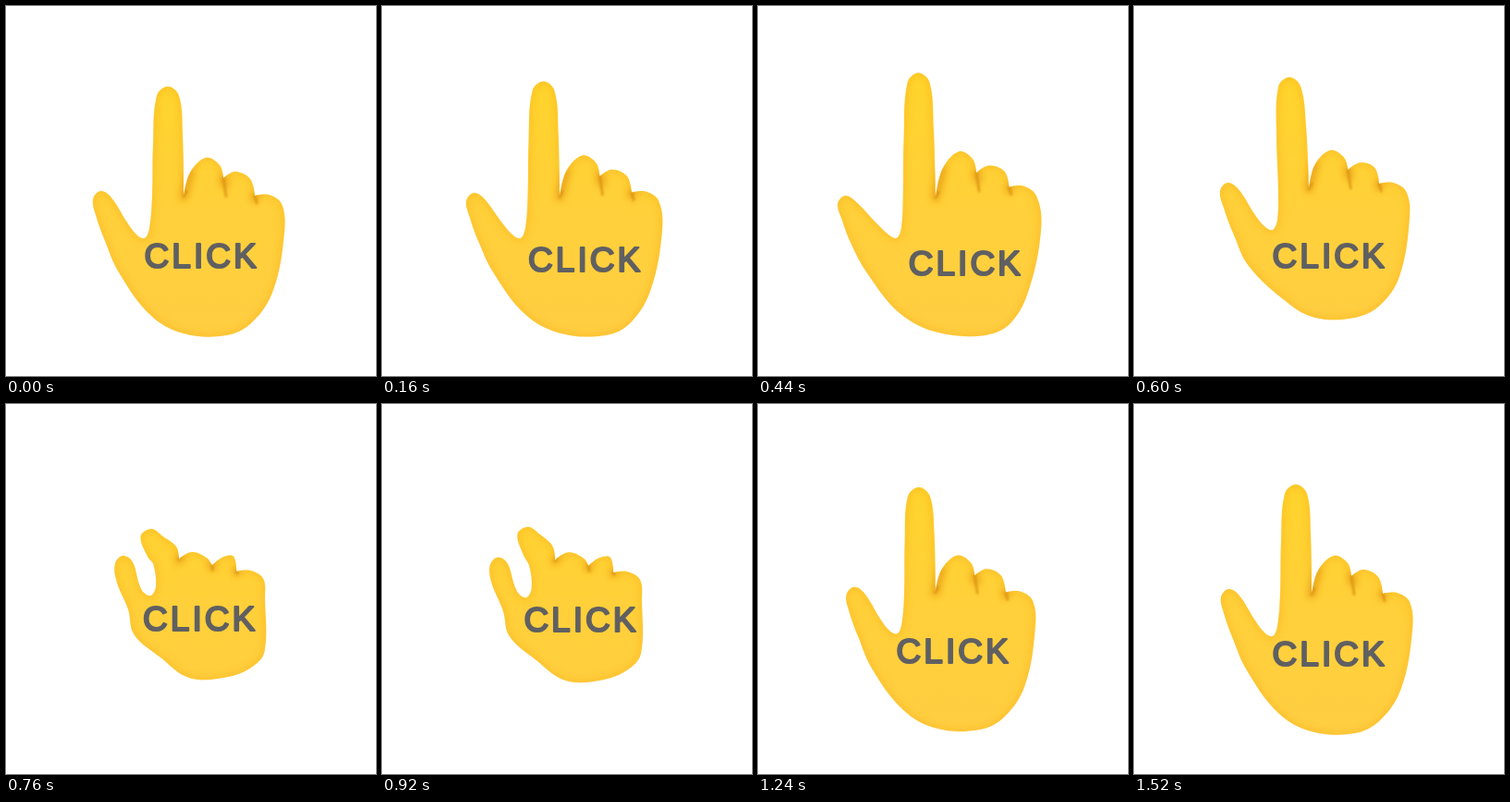
An HTML page that plays this animation: 400 px wide and 400 px high, repeating every 1.56 s.

```html
<!DOCTYPE html>
<html lang="en">
<head>
<meta charset="utf-8">
<title>Click</title>
<style>
  html, body { margin: 0; width: 100%; height: 100%; overflow: hidden; background: #fff; }
  svg { display: block; width: 100%; height: 100%; }
  text {
    font: 37px "Liberation Sans", Arial, sans-serif;
    letter-spacing: 3px;
    fill: #606062;
    stroke: #606062;
    stroke-width: 2.2px;
    stroke-linejoin: round;
  }
</style>
</head>
<body>
<svg viewBox="0 0 400 400">
  <defs>
    <linearGradient id="skin" gradientUnits="userSpaceOnUse" x1="0" y1="80" x2="0" y2="357">
      <stop offset="0" stop-color="#ffd42c"/>
      <stop offset=".5" stop-color="#ffd03a"/>
      <stop offset="1" stop-color="#ffce42"/>
    </linearGradient>
    <filter id="soft" filterUnits="userSpaceOnUse" x="0" y="0" width="400" height="400">
      <feGaussianBlur stdDeviation="3.5"/>
    </filter>
    <filter id="fine" filterUnits="userSpaceOnUse" x="0" y="0" width="400" height="400">
      <feGaussianBlur stdDeviation="1.3"/>
    </filter>
    <clipPath id="clip"><path id="edge"/></clipPath>
  </defs>
  <path id="hand" fill="url(#skin)"/>
  <g clip-path="url(#clip)" fill="none" stroke-linecap="round">
    <path id="rim" stroke="#f9b31c" stroke-width="6" opacity=".5" filter="url(#soft)"/>
    <path id="shade" stroke="#e39a14" stroke-width="9" opacity=".65" filter="url(#soft)"/>
    <path id="crease" stroke="#d98e10" stroke-width="2.6" opacity=".8" filter="url(#fine)"/>
  </g>
  <text id="label">CLICK</text>
</svg>
<script>
const LOOP = 1560, STEP = 40;
const $ = id => document.getElementById(id);

// Sharp notches between the fingers; the rest of the outline is smooth.
const gap = [192, 206], cut = [235, 186], nick = [269, 205];
const sharp = new Set([gap, cut, nick]);
const index = [[150, 251], [155, 240], [158, 205], [159, 150], [163, 97], [175, 87], [187, 97], [191, 140]];
const knuckles = [gap, [199, 180], [216, 164], [231, 172], cut, [248, 179], [264, 187], nick, [284, 204], [298, 214]];
const palm = [[301, 244], [289, 307], [266, 342], [238, 356], [192, 354], [156, 334], [122, 288]];
const thumb = [[107, 254], [97, 226], [94, 209], [102, 200], [113, 206], [131, 234], [142, 248]];
const shape = [...index, ...knuckles, ...palm, ...thumb];

// Handles that bend the hand: place, then shift when raised, tilted and pressed.
const rig = [
  { at: [150, 251], by: [[0, 0], [0, -9], [7, -44]] },        // web
  { at: [175, 87], by: [[-1, -11], [-7, -10], [-18, 48]] },   // index tip
  { at: [175, 145], by: [[-1, -5], [-5, -8], [-6, 17]] },     // index joint
  { at: gap, by: [[0, 1], [-3, -8], [-5, -38]] },
  { at: [216, 164], by: [[1, -5], [-4, -8], [-14, -4]] },     // middle knuckle
  { at: [284, 204], by: [[2, -7], [-4, -13], [-20, -24]] },   // little knuckle
  { at: [301, 244], by: [[4, -4], [-3, -16], [-21, -32]] },   // side
  { at: [238, 356], by: [[7, 0], [0, -19], [2, -61]] },       // base
  { at: [156, 334], by: [[-2, -1], [4, -18], [11, -60]] },    // heel
  { at: [107, 254], by: [[-5, 2], [2, -4], [25, -32]] },      // thumb root
  { at: [102, 200], by: [[-6, 4], [-1, -9], [24, -36]] }      // thumb tip
];

// Time, then amounts of raise, tilt, press and sideways label slide.
const keys = [
  [0, 0, 0, 0, 0],
  [280, 1, 0, 0, 14],
  [420, 1.35, 0, 0, 14],
  [560, .5, .6, 0, 0],
  [600, 0, 1, 0, 0],
  [760, 0, 0, 1, -1.5],
  [840, 0, 0, 1.07, -1.5],
  [1040, 0, 0, .6, 13.5],
  [1240, 0, 0, .06, 0],
  [1400, 0, 0, 0, 0]
].map(([t, ...v]) => ({ t, v }));

const keyAt = i => {
  const n = keys.length, turn = Math.floor(i / n), k = keys[i - turn * n];
  return { t: k.t + turn * LOOP, v: k.v };
};

// Monotone cubic: the slope vanishes at every turning point.
const slope = (a, b) => a * b > 0 ? 2 * a * b / (a + b) : 0;

function sample(t) {
  let i = 0;
  while (keyAt(i + 1).t <= t) i++;
  const [p, a, b, n] = [i - 1, i, i + 1, i + 2].map(keyAt);
  const h = b.t - a.t, u = (t - a.t) / h;
  return a.v.map((y, j) => {
    const z = b.v[j], d = (z - y) / h;
    const m0 = slope((y - p.v[j]) / (a.t - p.t), d) * h;
    const m1 = slope(d, (n.v[j] - z) / (n.t - b.t)) * h;
    return y + (z - y) * u * u * (3 - 2 * u) + u * (1 - u) * (m0 * (1 - u) - m1 * u);
  });
}

const dist = (a, b) => Math.hypot(b[0] - a[0], b[1] - a[1]);

// Each point follows the handles, the nearest ones most.
function bend(p, amounts) {
  let sum = 0, dx = 0, dy = 0;
  for (const { at, by } of rig) {
    const w = 1 / (dist(p, at) ** 3 + .01);
    sum += w;
    by.forEach(([x, y], i) => {
      dx += w * x * amounts[i];
      dy += w * y * amounts[i];
    });
  }
  return [p[0] + dx / sum, p[1] + dy / sum];
}

const fmt = (...n) => n.map(x => x.toFixed(2)).join(" ");
const line = ([x, y], dx, dy) => "M" + fmt(x, y) + "l" + fmt(dx, dy);

function outline(pts) {
  const n = pts.length, at = i => pts[(i + n) % n];
  const dir = i => {
    if (sharp.has(shape[i % n])) return [0, 0];
    const a = at(i - 1), c = at(i + 1), l = dist(a, at(i)) + dist(at(i), c);
    return [(c[0] - a[0]) / l, (c[1] - a[1]) / l];
  };
  let d = "M" + fmt(...pts[0]);
  for (let i = 0; i < n; i++) {
    const a = at(i), b = at(i + 1), s = dir(i), e = dir(i + 1), l = dist(a, b) * .37;
    d += "C" + fmt(a[0] + s[0] * l, a[1] + s[1] * l, b[0] - e[0] * l, b[1] - e[1] * l, ...b);
  }
  return d + "Z";
}

function draw(time) {
  const [raise, tilt, press, slide] = sample(Math.floor(time % LOOP / STEP) * STEP);
  const move = p => bend(p, [raise, tilt, press]);
  const d = outline(shape.map(move));
  for (const id of ["hand", "edge", "rim"]) $(id).setAttribute("d", d);

  const k = 1 - .75 * press;
  const [g, side, c, n] = [gap, [199, 180], cut, nick].map(move);
  $("shade").setAttribute("d",
    "M" + fmt(...side) + "L" + fmt(...g) + line(c, 2 * k, 8 * k) + line(n, 0, 3 * k));
  $("crease").setAttribute("d",
    line(g, 3 * k, -6 * k) + line(c, 3 * k, 20 * k) + line(n, 2 * k, 8 * k));

  $("label").setAttribute("x", 149.6 + slide);
  $("label").setAttribute("y", 282.7 + 8 * Math.min(raise, 1) - 38 * press);
}

const start = performance.now();
function tick() {
  draw(performance.now() - start);
  requestAnimationFrame(tick);
}
tick();
</script>
</body>
</html>
```
